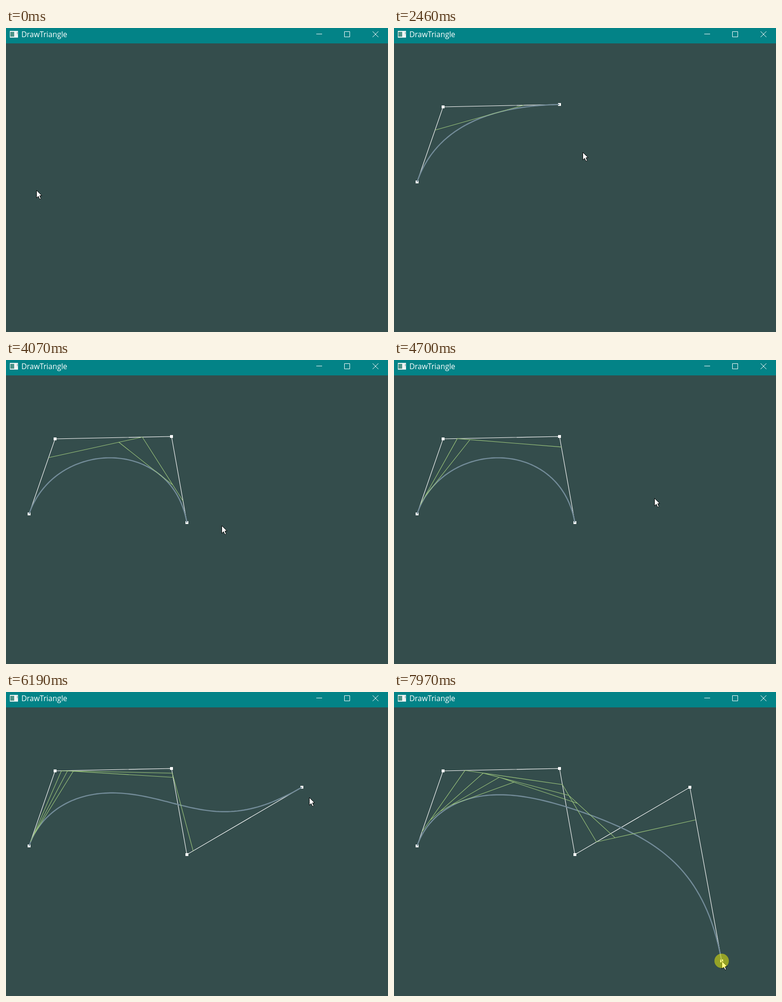
Write an HTML page that moves like this. It is 794x632 px and loops after 8 s.

```html
<!DOCTYPE html>
<html lang="en">
<head>
<meta charset="utf-8">
<title>DrawTriangle</title>
<style>
  html, body { margin: 0; width: 100%; height: 100%; overflow: hidden; background: #344d4c; }
  svg { display: block; width: 794px; height: 632px; }
  text { font: 15.5px "Open Sans", "Noto Sans", sans-serif; fill: #fff; }
  .line { fill: none; stroke-width: 1.1; }
</style>
</head>
<body>
<svg viewBox="0 0 794 632">
  <rect width="794" height="632" fill="#344d4c"/>
  <rect width="794" height="32" fill="#038387"/>
  <rect x="8" y="6" width="17" height="14" fill="#eef3f3"/>
  <rect x="9" y="8" width="8" height="10" fill="#4d9488"/>
  <rect x="23" y="8" width="1" height="5" fill="#7a9a9a"/>
  <text x="32" y="19">DrawTriangle</text>
  <path d="M645 12.5h12M703.5 7.5h11v11h-11zM762 7l12 12M774 7l-12 12" fill="none" stroke="#fff"/>

  <path id="edges" class="line" stroke="#fff"/>
  <path id="dots" fill="#fff"/>
  <path id="curve" fill="none" stroke="#738c99" stroke-width="2.4"/>
  <path id="hull" class="line" stroke="#9cc67c"/>
  <path id="cursor" d="M.5 .5V16.3L4.2 12.8 6.8 18.5H8.8L9.4 17.6 7.2 12V11.5H11.5Z" fill="#fff" stroke="#000"/>
  <circle id="halo" r="15" fill="#ff0" fill-opacity=".48"/>
</svg>
<script>
const LOOP = 8000, DOT_DELAY = 70, REST_BEFORE = 120, REST_AFTER = 235;

// control points, each placed by a click: time, x, y
const clicks = [
  [360, 48, 320], [1050, 102, 164], [1740, 344, 159],
  [3370, 376, 338], [5800, 615, 198], [7880, 681, 559]
];

// where the pointer wanders between clicks
const bends = [
  [0, 63, 337], [2460, 392, 258], [2850, 392, 293], [4070, 448, 344],
  [4550, 537, 296], [5340, 552, 255], [6450, 662, 292], [6970, 631, 426]
];

// the pointer rests on a point around its click
const rests = clicks.flatMap(([t, x, y]) => [[t - REST_BEFORE, x, y], [t + REST_AFTER, x, y]]);
const path = [...bends, ...rests].sort((a, b) => a[0] - b[0]);

// curve parameter before wrapping to 0..1: time, value
const phase = [[2460, 0.69], [4070, 1.749], [5340, 2.5], [6970, 3.562], [7970, 4.187]];

const $ = id => document.getElementById(id);
const mix = (a, b, t) => a + (b - a) * t;
const poly = list => 'M' + list.map(p => p[0].toFixed(2) + ' ' + p[1].toFixed(2)).join('L');

function segment(keys, t) {
  let i = 0;
  while (i < keys.length - 2 && keys[i + 1][0] <= t) i++;
  return i;
}

function linear(keys, t) {
  const i = segment(keys, t), [t0, v0] = keys[i], [t1, v1] = keys[i + 1];
  return mix(v0, v1, (t - t0) / (t1 - t0));
}

// smooth interpolation that never overshoots its keys
function smooth(keys, t, k) {
  const slope = i => keys[i + 1] && keys[i]
    ? (keys[i + 1][k] - keys[i][k]) / (keys[i + 1][0] - keys[i][0]) : 0;
  const tangent = i => {
    const a = slope(i - 1), b = slope(i);
    return a * b > 0 ? 2 * a * b / (a + b) : 0;
  };
  const i = segment(keys, t), h = keys[i + 1][0] - keys[i][0], u = (t - keys[i][0]) / h;
  return mix(keys[i][k], keys[i + 1][k], u * u * (3 - 2 * u))
    + h * u * (1 - u) * ((1 - u) * tangent(i) - u * tangent(i + 1));
}

// one de Casteljau step
const reduce = (list, t) => list.slice(1).map((p, i) => p.map((v, k) => mix(list[i][k], v, t)));

function bezier(list, t) {
  while (list.length > 1) list = reduce(list, t);
  return list[0];
}

function hull(list, t) {
  let d = '';
  for (list = reduce(list, t); list.length > 1; list = reduce(list, t)) d += poly(list);
  return d;
}

function draw(time) {
  const shown = clicks.filter(c => time >= c[0] + DOT_DELAY).map(c => c.slice(1));
  const full = shown.length > 2;
  const t = linear(phase, time);

  $('edges').setAttribute('d', shown.length > 1 ? poly(shown) : '');
  $('dots').setAttribute('d', shown.map(([x, y]) => `M${x - 3} ${y - 3}h6v6h-6z`).join(''));
  $('curve').setAttribute('d', full ? poly(Array.from({ length: 101 }, (_, i) => bezier(shown, i / 100))) : '');
  $('hull').setAttribute('d', full ? hull(shown, t - Math.floor(t)) : '');

  const [x, y] = [1, 2].map(k => Math.round(smooth(path, Math.min(time, path.at(-1)[0]), k)));
  $('cursor').setAttribute('transform', `translate(${x} ${y})`);

  const hit = clicks.find(([at]) => time >= at && time < at + REST_AFTER);
  $('halo').setAttribute('visibility', hit ? 'visible' : 'hidden');
  if (hit) $('halo').setAttribute('transform', `translate(${hit[1]} ${hit[2]})`);
}

const start = performance.now();
function tick() {
  draw((performance.now() - start) % LOOP);
  requestAnimationFrame(tick);
}
tick();
</script>
</body>
</html>
```
